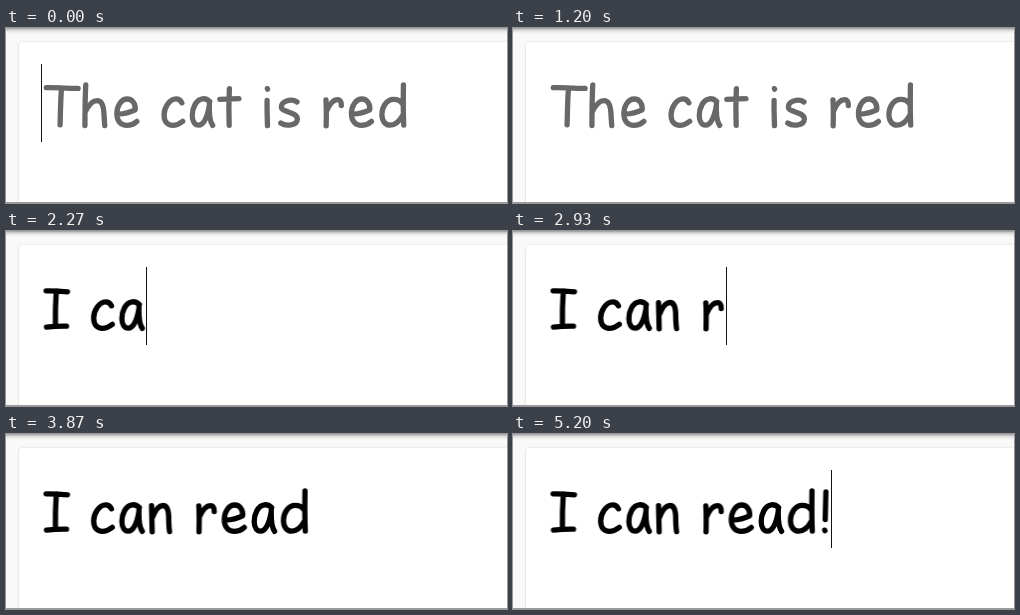
Animation of 501 by 175 pixels, one loop 5.59 s. Source, as an HTML page:

```html
<!DOCTYPE html>
<html lang="en">
<head>
<meta charset="utf-8">
<title>Typing field</title>
<style>
  html, body { margin: 0; width: 100%; height: 100%; overflow: hidden; background: #f9f9f9; }
  #stage { position: relative; width: 501px; height: 175px; overflow: hidden; background: #f9f9f9; }
  #card {
    position: absolute; left: 13px; top: 14px; width: 520px; height: 200px;
    background: #fff; border-radius: 3px;
    box-shadow: 0 0 2px rgba(0, 0, 0, .16), 0 1px 2px rgba(0, 0, 0, .08);
  }
  #bar {
    position: absolute; left: 0; top: 0; width: 100%; height: 6px;
    background: linear-gradient(#989898, #c8c8c8 25%, #e6e6e6 50%, #f9f9f9);
  }
  #edge { position: absolute; left: 0; bottom: 0; width: 100%; height: 1px; background: #9c9c9c; }
  svg { position: absolute; left: 0; top: 0; }
  path { fill: none; stroke-width: 5.3; stroke-linecap: round; stroke-linejoin: round; }
  #hint { stroke: #686868; }
  #typed { stroke: #000; }
</style>
</head>
<body>
<div id="stage">
  <div id="card"></div>
  <div id="bar"></div>
  <svg width="501" height="175" role="img" aria-label="The cat is red. I can read!">
    <g id="hint"></g>
    <g id="typed"></g>
    <rect id="caret" y="36" width="1" height="78" fill="#111"/>
  </svg>
  <div id="edge"></div>
</div>
<script>
const LOOP = 5590, SIZE = 56, LEFT = 35.5, BASELINE = 98;

// Handwritten letters: advance in 1/2048 em, then pen strokes relative to the baseline.
const GLYPHS = {
  ' ': [612, ''],
  I: [1120, 'M4.6-38.2Q15-38.3 26-37.2M5-1.8Q14-2.9 25-2.8M14.8-38Q13.7-22 13.9-3'],
  T: [1391, 'M4.8-38.3C14-38.6 26-37.8 36.6-37.6M20-38C19-25 18.9-12 18.6-1.2'],
  h: [1182, 'M6.2-41C5.6-28 5.4-14 5.4-.4M5.6-14C9-21 13-25.4 17.5-25.4C22.5-25.4 24-20 24.4-13C24.6-8 25-4 25.2-.4'],
  e: [1122, 'M6-11.8C12-12.2 18-13.6 23.3-16.2C24-22 20.5-27 15.5-27C9-27 5-19.5 5-12.5C5-4.5 9.5-.6 15-.6C19-.6 22-2 25-4.6'],
  c: [1053, 'M22.6-23.2C21-26.5 19-27.2 16.8-27.2C10-27.2 4.8-18 4.8-11C4.8-4 8.5-.6 13.5-.6C17.5-.6 20.5-2.5 23.4-4.6'],
  a: [1050, 'M21.6-24.5C19-27 17-27.4 14.5-27.2C8-26.5 4.2-18 4.2-10.5C4.2-4 7-.8 10.5-.8C15.5-.8 19.5-9 21.2-20M21.4-24.5C21-17 20.8-6 24.6-.6'],
  t: [965, 'M3-26.6L22.2-27.4M12.6-37.4C12-25 12-12 12.4-.6'],
  i: [573, 'M7.2-25.6C7-17 7.4-8 7.6-.4M7.5-37.4L7.7-36.8'],
  s: [997, 'M21.4-24C16-28 5.8-25 5.8-19C5.8-13.5 21.8-14.5 21.8-7C21.8-.2 10 .5 5.2-3'],
  r: [983, 'M6.4-26.2C7-18 6.8-8 6.6-.2M6.8-14.5C9.5-21 13.5-26.4 18-26.4C21.2-26.4 21.8-23.5 21.8-20.5'],
  d: [1203, 'M26.3-41C26.1-28 26.1-12 26.6-.8M25.5-22C23-26 20-26.6 16.5-26.6C9.5-26.6 4.8-19 4.8-11.5C4.8-4.5 8.5-.8 13-.8C18-.8 22.5-5 25.8-11'],
  n: [1072, 'M5.2-26.4L5.8-.2M5.8-14C8.5-21 12.5-26.5 16.5-26.5C20.5-26.5 22-22 22.3-16C22.4-10 22.3-6 23.2-.4'],
  '!': [487, 'M7.3-40.2Q7-26 6.6-12.5M6.1-1.9L6.3-1.3']
};

const HINT = 'The cat is red', TEXT = 'I can read!';

// [time, letters typed, caret visible]
const STEPS = [
  [0, 0, 1], [200, 0, 0], [730, 0, 1], [1200, 0, 0],
  [1530, 1, 1], [2000, 2, 1], [2130, 3, 1], [2270, 4, 1], [2400, 5, 1], [2530, 6, 1],
  [2930, 7, 1], [3130, 8, 1], [3200, 9, 1], [3400, 10, 1], [3870, 10, 0],
  [4200, 11, 1], [4730, 11, 0], [5200, 11, 1]
];

const byId = id => document.getElementById(id);

const penX = (text, count) =>
  [...text].slice(0, count).reduce((x, ch) => x + GLYPHS[ch][0] * SIZE / 2048, LEFT);

function write(group, text) {
  return [...text].map((ch, i) => {
    const path = document.createElementNS('http://www.w3.org/2000/svg', 'path');
    path.setAttribute('d', GLYPHS[ch][1]);
    path.setAttribute('transform', `translate(${penX(text, i)} ${BASELINE})`);
    return group.appendChild(path);
  });
}

// Holds each state until the next one, then loops.
function play(element, states) {
  const frames = states.map(([time, style]) => ({ ...style, offset: time / LOOP, easing: 'step-end' }));
  frames.push({ ...states[states.length - 1][1], offset: 1 });
  element.animate(frames, { duration: LOOP, iterations: Infinity });
}

write(byId('hint'), HINT);
const firstKey = STEPS.find(step => step[1] === 1)[0];
play(byId('hint'), [[0, { opacity: 1 }], [firstKey, { opacity: 0 }]]);

write(byId('typed'), TEXT).forEach((letter, i) => {
  const shownAt = STEPS.find(step => step[1] > i)[0];
  play(letter, [[0, { opacity: 0 }], [shownAt, { opacity: 1 }]]);
});

play(byId('caret'), STEPS.map(([time, count, on]) =>
  [time, { opacity: on, transform: `translateX(${Math.floor(penX(TEXT, count))}px)` }]));
</script>
</body>
</html>
```
